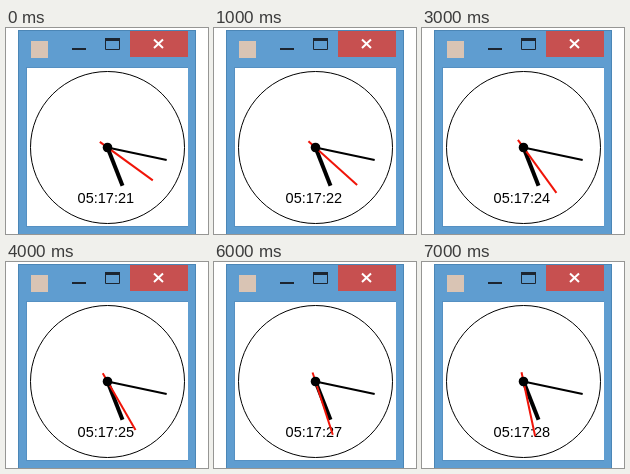
Animation, 202 px wide and 206 px high, one loop 8000 ms. Source, as an HTML page:

```html
<!DOCTYPE html>
<html lang="en">
<head>
<meta charset="utf-8">
<title>Analog clock</title>
<style>
  html, body { margin: 0; width: 100%; height: 100%; overflow: hidden; background: #fff; }
  svg { display: block; width: 100vw; height: 100vh; }
  text { font: 14.5px "Liberation Sans", Arial, sans-serif; }
</style>
</head>
<body>
<svg viewBox="0 0 202 206">
  <!-- window -->
  <rect width="202" height="206" fill="#fff"/>
  <rect x="12.5" y="2.5" width="177" height="210" fill="#5f9dd0" stroke="#4b86b6"/>
  <rect x="20" y="39" width="162" height="160" fill="#5590c2"/>
  <rect x="21" y="40" width="161" height="158" fill="#fff"/>

  <!-- title bar -->
  <rect x="25" y="13" width="17" height="17" fill="#d9c4b4"/>
  <rect x="66" y="20" width="14" height="2" fill="#1c2530"/>
  <path d="M99.5 11V21.5H113.5V11" fill="none" stroke="#1c2530"/>
  <rect x="99" y="10" width="15" height="3" fill="#1c2530"/>
  <rect x="124" y="3" width="58" height="26" fill="#c75050"/>
  <path d="M148 11.5L157 20M157 11.5L148 20" stroke="#fff" stroke-width="2"/>

  <!-- clock -->
  <ellipse cx="101.5" cy="119.5" rx="77" ry="76" fill="#fff" stroke="#000"/>
  <text id="label" x="71.6" y="175" fill="#000"></text>
  <line id="hour" stroke="#000" stroke-width="4"/>
  <line id="minute" stroke="#000" stroke-width="2"/>
  <line id="second" stroke="#f01408" stroke-width="2"/>
  <circle cx="101.5" cy="119.5" r="4.8"/>
</svg>
<script>
  const CX = 101.5, CY = 119.5;
  const START = 5 * 3600 + 17 * 60 + 21;
  const LOOP = 8000;
  const el = id => document.getElementById(id);
  const pad = n => String(n).padStart(2, "0");

  function setHand(id, degrees, length, tail = 0) {
    const a = degrees * Math.PI / 180;
    const dx = Math.sin(a), dy = -Math.cos(a);
    const hand = el(id);
    hand.setAttribute("x1", CX - dx * tail);
    hand.setAttribute("y1", CY - dy * tail);
    hand.setAttribute("x2", CX + dx * length);
    hand.setAttribute("y2", CY + dy * length);
  }

  function draw(ms) {
    const time = START + Math.floor((ms % LOOP) / 1000);
    const h = Math.floor(time / 3600);
    const m = Math.floor(time / 60) % 60;
    const s = time % 60;
    setHand("hour", h * 30 + m / 2, 41);
    setHand("minute", m * 6, 60.5);
    setHand("second", s * 6, 56, 9.5);
    el("label").textContent = [h, m, s].map(pad).join(":");
  }

  const begin = performance.now();
  function tick() {
    draw(performance.now() - begin);
    requestAnimationFrame(tick);
  }
  tick();
</script>
</body>
</html>
```
